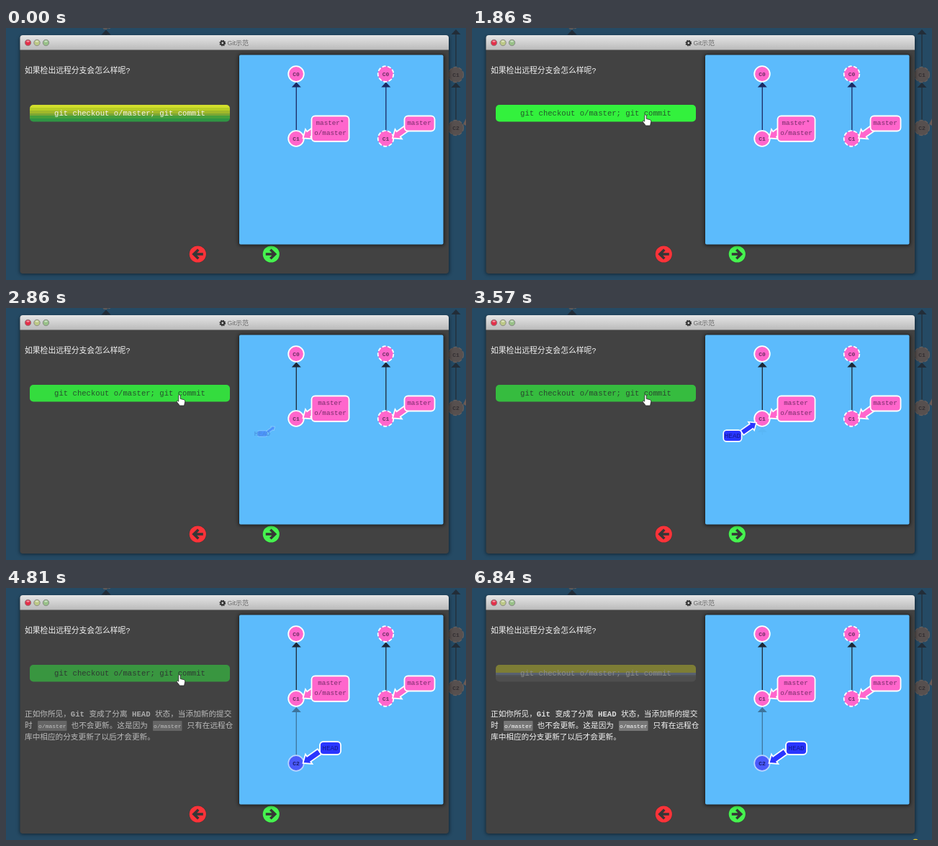
These frames come from a looping animation (639x351 px, 7000 ms). An HTML page:

```html
<!DOCTYPE html>
<html lang="zh">
<head>
<meta charset="utf-8">
<title>Git示范</title>
<style>
  html, body { margin: 0; width: 100%; height: 100%; overflow: hidden; background: #254a64; }
  svg { display: block; width: 639px; height: 351px; }
  text { font-family: "Liberation Mono", "Noto Sans CJK SC", "Noto Sans CJK", monospace; dominant-baseline: central; }
  .prose { font-size: 10.65px; fill: #f4f4f4; }
  .prose .latin { font-weight: bold; fill: #ddd; }
  .prose .chip { font-size: 8px; fill: #fff; }
  .mid { text-anchor: middle; }
  .node { font-size: 8px; font-weight: bold; text-anchor: middle; fill: #6b2f62; }
  .tag { font-size: 9.3px; text-anchor: middle; fill: #752c68; }
  .pink { fill: #ff66cc; stroke: #fff; stroke-width: 1.8; }
  .blue { fill: #2a36ff; stroke: #fff; stroke-width: 1.8; }
</style>
</head>
<body>
<svg id="stage" viewBox="0 0 639 351"></svg>
<script>
const LOOP = 7000;
const stage = document.getElementById('stage');

// Markup helpers
const arrowPath = 'M0 0L10-8.2V-4.4H28V4.4H10V8.2Z';
const edge = (x, top, bottom, extra = '') =>
  `<g ${extra}><path d="M${x} ${top + 6}V${bottom}" stroke="currentColor" stroke-width="1.3"/>
   <path d="M${x} ${top}l6.5 7h-13z" fill="currentColor"/></g>`;
const commit = (x, y, name, dashed) =>
  `<circle class="pink" cx="${x}" cy="${y}" r="10.8" ${dashed ? 'stroke-dasharray="5 2.6"' : ''}/>
   <text class="node" x="${x}" y="${y}">${name}</text>`;
const ghost = (x, y, name) =>
  `<circle cx="${x}" cy="${y}" r="10.5" fill="#57504f" stroke="#635e5d" stroke-width="1.3" stroke-dasharray="5 2.6"/>
   <text class="node" x="${x}" y="${y}" style="fill:#343033">${name}</text>`;
const pointer = (x, y, cls) =>
  `<path class="${cls}" d="${arrowPath}" transform="translate(${x} ${y}) rotate(-35)"/>`;
const box = (x, y, w, h, cls) =>
  `<rect class="${cls}" x="${x}" y="${y}" width="${w}" height="${h}" rx="5"/>`;
const bands = (id, list) =>
  `<linearGradient id="${id}" x2="0" y2="1">${list.map(([color, from, to]) =>
    `<stop offset="${from}" stop-color="${color}"/><stop offset="${to}" stop-color="${color}"/>`).join('')}</linearGradient>`;
const light = (x, color) =>
  `<circle cx="${x}" cy="20.5" r="4.2" fill="${color}" stroke="#858585" stroke-width=".9"/>
   <ellipse cx="${x}" cy="18.6" rx="2.2" ry="1.2" fill="#fff" opacity=".5"/>`;
const navButton = (x, color, dir) =>
  `<g transform="translate(${x} 315) scale(${dir} 1)"><circle r="12" fill="#222" opacity=".35"/>
   <circle r="11.6" fill="${color}"/>
   <path d="M-7.5 0H5M-1-6.2L5.4 0L-1 6.2" fill="none" stroke="#363636" stroke-width="3.6"/></g>`;
const chip = (x) =>
  `<rect x="${x}" y="185" width="40.5" height="14" rx="1" fill="#777"/>
   <text class="chip mid" x="${x + 20.3}" y="192">o/master</text>`;

stage.innerHTML = `
<defs>
  ${bands('fresh', [['#d2de2c', 0, .17], ['#b7cd25', .17, .36], ['#a0b82a', .36, .52],
    ['#7da634', .52, .64], ['#45a03c', .64, .82], ['#2f9544', .82, 1]])}
  ${bands('used', [['#7d7d35', 0, .48], ['#596170', .48, .6], ['#505357', .6, .7], ['#4e4e4e', .7, 1]])}
  <linearGradient id="bar" x2="0" y2="1"><stop stop-color="#e6e6e6"/><stop offset="1" stop-color="#bababa"/></linearGradient>
  <filter id="soft" x="-10%" y="-10%" width="120%" height="120%"><feGaussianBlur stdDeviation="2.5"/></filter>
</defs>
<rect width="639" height="351" fill="#254a64"/>
<g color="#222d38">
  ${edge(139, 2.5, 10)}${edge(625, 2, 53)}${edge(625, 76, 128)}
</g>
${ghost(139, -9, '')}${ghost(625, 65, 'C1')}${ghost(625, 139, 'C2')}
<path d="M635 134l4-8v10z" fill="#6b5a55"/>

<rect x="19" y="12" width="597" height="331" rx="4" fill="#000" opacity=".5" filter="url(#soft)"/>
<rect x="19.5" y="10" width="595.5" height="332" rx="4" fill="#424242"/>
<path d="M19.5 30.5V14q0-4 4-4H611q4 0 4 4V30.5Z" fill="url(#bar)"/>
${light(30.5, '#e2304a')}${light(43, '#bcc886')}${light(55.5, '#98c088')}
<g fill="none" stroke="#333"><circle cx="300.8" cy="21" r="2.4" stroke-width="2"/>
  <circle cx="300.8" cy="21" r="3.6" stroke-width="1.6" stroke-dasharray="1.5 1.33"/></g>
<text x="307.5" y="21" font-size="9" fill="#6a6a6a" style="font-family:'Liberation Sans','Noto Sans CJK SC',sans-serif">Git示范</text>

<text class="prose" x="26" y="60" style="font-size:10.8px">如果检出远程分支会怎么样呢?</text>
<rect id="button" x="33" y="107" width="278" height="23.5" rx="5"/>
<text id="command" class="mid" x="172" y="119" font-size="10.6">git checkout o/master; git commit</text>
<g id="answer" class="prose">
  <text x="26" y="176">正如你所见，<tspan class="latin">Git</tspan> 变成了分离 <tspan class="latin">HEAD</tspan> 状态，当添加新的提交</text>
  <text x="26" y="192">时</text>${chip(44)}
  <text x="90.5" y="192">也不会更新。这是因为</text>${chip(204)}
  <text x="251.5" y="192">只有在远程仓</text>
  <text x="26" y="208">库中相应的分支更新了以后才会更新。</text>
</g>
${navButton(266.3, '#fb3339', -1)}${navButton(368.3, '#46f24f', 1)}

<rect x="323" y="37" width="286" height="266" rx="3" fill="#000" opacity=".6" filter="url(#soft)"/>
<rect x="324" y="37.5" width="283.5" height="264" rx="2" fill="#5cbbfc"/>
<g id="edges">${edge(403.3, 75.5, 142)}${edge(527.8, 75.5, 142)}</g>
<g id="newEdge" color="#20303f"><path id="newLine" stroke="currentColor" stroke-width="1.3"/>
  <path d="M403.3 166l6.5 7h-13z" fill="currentColor"/></g>
<g id="newCommit"><circle r="10.8" fill="#4a5afb" stroke="#b9d4ff" stroke-width="1.7"/>
  <text class="node" style="fill:#1a1f70">C2</text></g>
${commit(403, 64, 'C0')}${commit(527.5, 64, 'C0', true)}
${commit(403, 154, 'C1')}${commit(527.5, 154, 'C1', true)}
${pointer(412.5, 153.5, 'pink')}${box(424.5, 122.5, 52, 35.5, 'pink')}
<text id="local" class="tag" x="450" y="132.5"></text><text class="tag" x="450.5" y="146">o/master</text>
${pointer(537, 153.5, 'pink')}${box(553.5, 122.5, 42, 21, 'pink')}
<text class="tag" x="574" y="132.5">master</text>
<g id="head">
  <g id="headShape">${pointer(-38, 21, 'blue')}${box(-14.5, -9, 29, 18, 'blue')}</g>
  <text class="tag" style="fill:#141a90">HEAD</text>
</g>
<circle id="spot" cx="616" cy="354.5" r="5" fill="#d8b72c"/>
<g id="cursor" fill="#fff" stroke="#222" stroke-width=".8" stroke-linejoin="round">
  <path id="arrow" d="M0 0V13.5L3.1 10.6L5.3 15.4L7.5 14.4L5.4 9.8H9.6Z"/>
  <path id="hand" d="M-1.3 1.2q1.3-2 2.5 0V6l5 1.2q1.8.6 1.5 2.6L6.6 15.5H.3L-3.8 10q0-1.8 1.3-1.3l1.2 1Z"/>
</g>`;

const part = Object.fromEntries([...stage.querySelectorAll('[id]')].map(el => [el.id, el]));
const set = (name, attrs) => Object.entries(attrs).forEach(([key, value]) => part[name].setAttribute(key, value));
const show = (name, on) => set(name, { opacity: +on });

// Time and easing
const progress = (t, from, to) => Math.min(1, Math.max(0, (t - from) / (to - from)));
const mix = (a, b, p) => a + (b - a) * p;
const smooth = p => p * p * (3 - 2 * p);
const easeOut = (p, power) => 1 - (1 - p) ** power;
function bounce(p) {
  const [offset, floor] = p < 1 / 2.75 ? [0, 0] : p < 2 / 2.75 ? [1.5, .75]
    : p < 2.5 / 2.75 ? [2.25, .9375] : [2.625, .984375];
  return 7.5625 * (p - offset / 2.75) ** 2 + floor;
}

function drawCursor(t) {
  const enter = easeOut(progress(t, 1300, 1860), 1.6);
  const leave = smooth(progress(t, 5690, 6500));
  const x = mix(mix(541, 241, enter), 594, leave);
  const y = mix(mix(323, 120.5, enter), 342, leave);
  const hover = x < 311 && y < 130.5;
  set('cursor', { transform: `translate(${x} ${y})`, opacity: +(t >= 1300 && t < 6520) });
  show('hand', hover);
  show('arrow', !hover);
  return hover;
}

function drawButton(t, hover) {
  const green = mix(mix(241, 188, easeOut(progress(t, 2720, 3420), 2.2)),
    132, easeOut(progress(t, 4660, 5280), 4));
  const fade = (241 - green) / 109;
  const flat = `rgb(${mix(51, 58, fade)},${green},${mix(61, 65, fade)})`;
  const ink = `rgb(${mix(36, 48, fade)},${mix(89, 50, fade)},${mix(43, 52, fade)})`;
  const idle = t < 3000 ? 'fresh' : 'used';
  set('button', { fill: hover ? flat : `url(#${idle})` });
  set('command', { fill: hover ? ink : t < 3000 ? '#f4f4ea' : '#8c8c88' });
}

function drawTree(t) {
  const appear = smooth(progress(t, 2720, 3120));
  const move = smooth(progress(t, 3510, 3910));
  const drop = progress(t, 3510, 4350);
  part.local.textContent = t < 2720 ? 'master*' : 'master';
  set('edges', { color: t < 2720 ? '#1b2a62' : '#1d2836' });
  // The label mirrors through its centre as it changes sides.
  set('head', { transform: `translate(${mix(356, 450.5, move)} ${mix(175, 223, move)})`, opacity: appear });
  set('headShape', { transform: `scale(${mix(-mix(.25, 1, appear), 1, move)})` });
  set('newEdge', { opacity: .5 * move });
  set('newLine', { d: `M403.3 172V${mix(173, 234, move)}` });
  set('newCommit', { transform: `translate(403 ${mix(154, 244, bounce(drop))})`, opacity: drop });
}

function frame() {
  const t = performance.now() % LOOP;
  drawButton(t, drawCursor(t));
  drawTree(t);
  set('answer', { opacity: easeOut(progress(t, 4660, 5280), 4) });
  show('spot', t >= 6840);
  requestAnimationFrame(frame);
}
frame();
</script>
</body>
</html>
```
